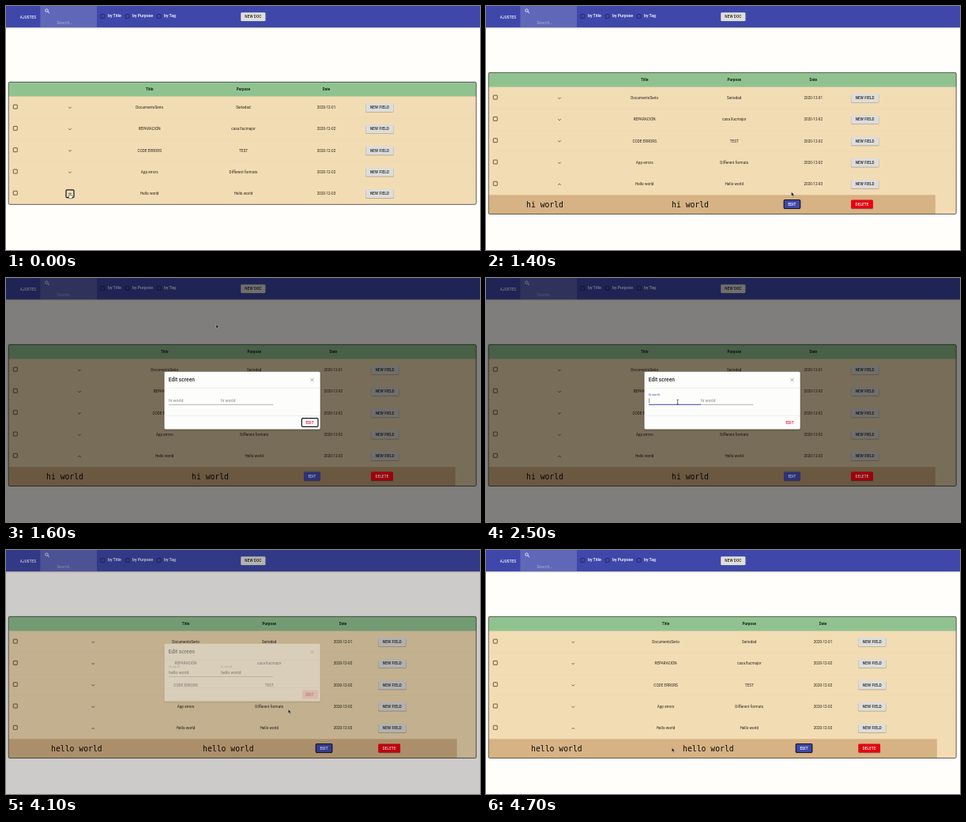
An HTML page for the animation above (4.8 s loop, 600 by 309 pixels).

```html
<!DOCTYPE html>
<html lang="en">
<head>
<meta charset="utf-8">
<title>Document table</title>
<style>
  html, body { margin: 0; width: 100%; height: 100%; overflow: hidden; background: #fffefb; }
  svg { display: block; width: 600px; height: 309px; }
  text { font-family: Roboto, Arial, sans-serif; white-space: pre; }
  .mono { font-family: "DejaVu Sans Mono", monospace; }
</style>
</head>
<body>
<svg id="stage" viewBox="0 0 600 309" xmlns="http://www.w3.org/2000/svg"></svg>
<script>
const LOOP = 4800, STEP = 100;
const INDIGO = '#3f48aa', INK = '#26231d', PINK = '#e3063f', WHEAT = '#f2dcb3';

const DOCS = [
  ['DocumentoSerio', 'Seriedad', '2020-12-01'],
  ['REPARACIÓN', 'casa llucmajor', '2020-12-02'],
  ['CODE ERRORS', 'TEST', '2020-12-02'],
  ['App errors', 'Different formats', '2020-12-02'],
  ['Hello world', 'Hello world', '2020-12-03']
];

// Column positions for the closed, opened and edited table
const LAYOUTS = {
  closed: { top: 96.3, arrow: 81, cols: [181.7, 300.5, 405.5], add: 455.5 },
  opened: { top: 84.3, arrow: 93, cols: [200.7, 314.3, 414.3], add: 462.2,
            value: 'hi world', values: [74.5, 258.5], edit: 377.2, end: 568.8 },
  edited: { top: 84.3, arrow: 110.3, cols: [227.6, 333.3, 426.5], add: 471.4,
            value: 'hello world', values: [89.4, 281.4], edit: 392.3, end: 570.8 }
};

// Pointer path: time, x, y, shape
const PATH = [
  [0, 81, 237, 'hand'], [200, 81, 237, 'arrow'], [400, 96, 232, 'arrow'],
  [700, 150, 240, 'arrow'], [1200, 386, 248, 'hand'], [1300, 387, 249, 'hand'],
  [1400, 386.6, 235.6, 'arrow'], [1600, 266, 58.8, 'arrow'], [1900, 262, 90, 'arrow'],
  [2300, 242.6, 157, 'beam'], [3100, 242.6, 157, 'beam'], [3200, 290, 164, 'arrow'],
  [3400, 369, 177, 'arrow'], [3600, 384, 182, 'hand'], [3900, 384, 182, 'arrow'],
  [4200, 344, 211.6, 'arrow'], [4700, 235.3, 250.5, 'arrow']
];

// Dialog opacity
const FADE = [[1400, 0], [1500, .55], [1600, 1], [3900, 1], [4000, .75], [4100, .4], [4200, .12], [4300, 0]];

const clamp = (v, a, b) => Math.min(b, Math.max(a, v));

function along(keys, t) {
  let i = 0;
  while (i < keys.length - 2 && t >= keys[i + 1][0]) i++;
  const [a, b] = [keys[i], keys[i + 1]];
  const p = clamp((t - a[0]) / (b[0] - a[0]), 0, 1);
  return a.slice(1).map((v, k) =>
    typeof v === 'number' ? v + (b[k + 1] - v) * p : p === 1 ? b[k + 1] : v);
}

const rect = (x, y, w, h, fill, more = '') =>
  `<rect x="${x}" y="${y}" width="${w}" height="${h}" fill="${fill}" ${more}/>`;
const path = (d, stroke, width, more = 'fill="none"') =>
  `<path d="${d}" stroke="${stroke}" stroke-width="${width}" ${more}/>`;
const text = (s, x, y, size, fill, more = '') =>
  `<text x="${x}" y="${y}" font-size="${size}" fill="${fill}" ${more}>${s}</text>`;
const centred = (s, x, y, fill, weight = 400) =>
  text(s, x, y, 4.6, fill, `text-anchor="middle" font-weight="${weight}" letter-spacing=".05"`);
const ring = (x, y, w, h) =>
  rect(x, y, w, h, 'none', 'rx="1.2" stroke="#15151c" stroke-width="1.2"');

function button(label, x, y, w, fill, ink) {
  return rect(x - .4, y + .7, w + .8, 11.2, '#000', 'rx="1.5" opacity=".13"')
    + rect(x, y + .5, w, 11, '#000', 'rx="1.3" opacity=".2"')
    + rect(x, y, w, 11, fill, 'rx="1.3"')
    + text(label, x + w / 2, y + 7.1, 4.6, ink,
        'text-anchor="middle" font-weight="500" letter-spacing=".13"');
}

function checkbox(x, y, stroke) {
  return rect(x - 2.5, y - 2.5, 5, 5, 'none', `rx=".5" stroke="${stroke}" stroke-width=".75"`);
}

function chevron(x, y, up) {
  const d = up ? -1 : 1;
  return path(`M${x - 1.8} ${y - .9 * d}l1.8 ${1.8 * d}l1.8 ${-1.8 * d}`, '#4b453a', .75);
}

function header() {
  let s = rect(0, 0, 600, 28.6, '#000', 'opacity=".1"') + rect(0, 0, 600, 27.9, '#000', 'opacity=".16"')
    + rect(0, 0, 600, 27, INDIGO) + rect(43.3, 0, 71.7, 27, '#5f67b8')
    + text('AJUSTES', 17.8, 15.7, 4.6, '#f4f4fb', 'font-weight="500" letter-spacing=".13"')
    + '<circle cx="51.5" cy="5.7" r="1.75" fill="none" stroke="#fff" stroke-width=".8"/>'
    + path('M52.8 7l2.2 2.2', '#fff', .9)
    + text('Search…', 64.2, 23.3, 5.25, '#a9aedb');
  [['by Title', 122.3, 129], ['by Purpose', 153.6, 160], ['by Tag', 193.6, 200]].forEach(([label, box, x]) => {
    s += checkbox(box, 13.1, '#1d2152') + text(label, x, 13.9, 5.2, '#fff', 'font-weight="500"');
  });
  return s + button('NEW DOC', 297.2, 8.3, 31.3, '#dfdfde', INK);
}

function actions(L, focused) {
  const y = L.top + 161.2;
  return button('EDIT', L.edit, y, 20.5, INDIGO, '#fff')
    + (focused ? ring(L.edit, y, 20.5, 11) : '')
    + button('DELETE', L.add, y, 27.6, '#e6000f', '#fff');
}

function table(L, t) {
  const open = Boolean(L.value), height = open ? 179.2 : 155;
  let s = rect(3.2, L.top, 592, height, WHEAT, 'rx="1.5"')
    + rect(3.2, L.top, 592, 18.3, '#90c290', 'rx="1"');
  ['Title', 'Purpose', 'Date'].forEach((name, i) => {
    s += centred(name, L.cols[i], L.top + 10.8, '#17201a', 700);
  });
  DOCS.forEach((doc, i) => {
    const y = L.top + 32 + i * 27.3, last = i === DOCS.length - 1;
    if (!last) s += rect(3.5, y + 13.5, 591.4, .35, '#e6d2ab');
    s += checkbox(11.8, y - .7, '#3a352b') + chevron(L.arrow, y + .4, open && last);
    doc.forEach((cell, k) => s += centred(cell, L.cols[k], y + 1.7, INK));
    s += button('NEW FIELD', L.add, y - 5.4, 35, '#dddddc', INK);
    if (last && t < 1300) s += ring(L.arrow - 5, y - 4.6, 10, 9.8);
  });
  if (open) {
    s += rect(3.2, L.top + 155, L.end - 3.2, 24.2, '#d6b284');
    L.values.forEach(x => {
      s += text(L.value, x, L.top + 170.3, 9.75, '#0d0b08', 'class="mono" text-anchor="middle"');
    });
    s += actions(L, t >= 1300 && t < 1500 || t >= 4000);
  }
  return s + rect(3.2, L.top, 592, height, 'none', 'rx="1.5" stroke="#3b3a33" stroke-width=".8"');
}

function field(x, value, focused) {
  const raised = focused || value;
  const wide = value.length * 2.39;
  return text('hi world', x, raised ? 149 : 157.3, raised ? 3.94 : 5.25, focused ? INDIGO : '#858585')
    + text(value, x, 157.3, 5.25, '#222')
    + (focused ? rect(x + wide + .1, 152.4, .5, 6.3, '#333') : '')
    + rect(x, focused ? 159.8 : 160, 66, focused ? 1 : .6, focused ? INDIGO : '#8b8b8b');
}

function dialog(t) {
  const typed = (from, span) => 'hello world'.slice(0, Math.round(11 * clamp((t - from) / span, 0, 1)));
  const hot = t >= 3600;
  let s = rect(199.5, 119.5, 199, 74, '#000', 'rx="2.5" opacity=".15"')
    + rect(200.5, 118.8, 197.2, 72.7, '#fdfdfb', 'rx="1.6"')
    + text('Edit screen', 205.8, 131.2, 6.55, '#25252b', 'font-weight="500" letter-spacing=".05"')
    + path('M385.4 126.9l4.2 4.2m0-4.2l-4.2 4.2', '#85858a', .7)
    + rect(200.5, 139.3, 197.2, .5, '#e2e2e0') + rect(200.5, 174.3, 197.2, .5, '#e2e2e0')
    + field(272, typed(3100, 300), t >= 3100 && t < 3700)
    + field(206, typed(2500, 500), t >= 2400 && t < 3100);
  if (hot) s += rect(375, 177.5, 20, 11, PINK, 'rx="1.2" opacity=".2"');
  if (t < 2400) s += ring(374.4, 177.6, 20.6, 10.8);
  return s + text('EDIT', 384.6, 184.7, 4.6, PINK,
    'text-anchor="middle" font-weight="500" letter-spacing=".13"');
}

const POINTERS = {
  arrow: path('M0 0v5l1.2-1 .9 1.9.9-.4-.9-1.8h1.6z', '#e8e8e8', .35, 'fill="#111"'),
  beam: path('M-1-2.8h2M0-2.8v5.6M-1 2.8h2', '#111', .6),
  hand: path('M-.8 0q.8-.9 1.4 0v2.4l2.2.6q.7.3.5 1.2l-.6 2.6h-3.4l-1.9-2.7q.4-.9 1.8 0z',
    '#222', .5, 'fill="#fff"')
};

function pointer(t) {
  const [x, y, shape] = along(PATH, t);
  return `<g transform="translate(${x} ${y})">${POINTERS[shape]}</g>`;
}

function scene(t) {
  const L = t < 200 ? LAYOUTS.closed : t < 3900 ? LAYOUTS.opened : LAYOUTS.edited;
  const [fade] = along(FADE, t);
  let s = rect(0, 0, 600, 309, '#fffefb') + header() + table(L, t);
  if (fade > 0) {
    s += rect(0, 0, 600, 309, '#000', `opacity="${fade * .5}"`)
      + `<g opacity="${fade * .4}">${actions(L, false)}</g>`
      + `<g opacity="${fade}">${dialog(t)}</g>`;
  }
  return s + pointer(t);
}

const stage = document.getElementById('stage');
const start = performance.now();
let shown = -1;

function tick() {
  const t = Math.floor((performance.now() - start) % LOOP / STEP) * STEP;
  if (t !== shown) {
    stage.innerHTML = scene(t);
    shown = t;
  }
  requestAnimationFrame(tick);
}
tick();
</script>
</body>
</html>
```
